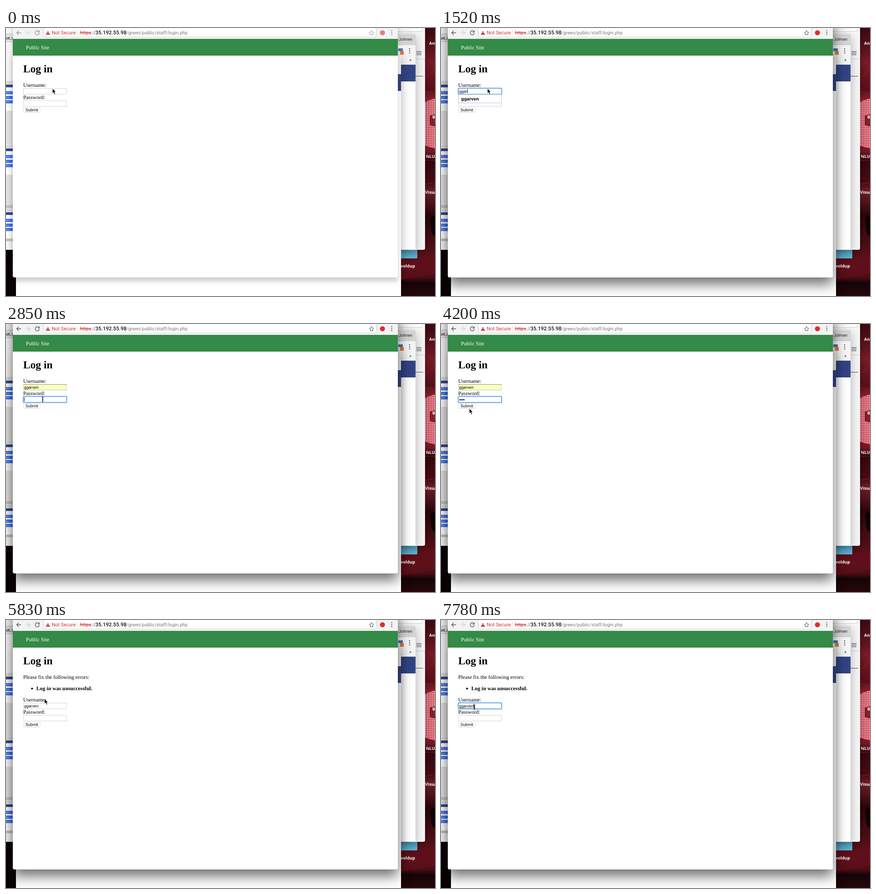
Recreate the animation shown at these times as an HTML page. Size 947 by 592 pixels, loop 8000 ms.

```html
<!DOCTYPE html>
<html lang="en">
<head>
<meta charset="utf-8">
<title>Log in</title>
<style>
  html, body { margin: 0; width: 100%; height: 100%; overflow: hidden; background: #0b0405; }
  svg { display: block; width: 947px; height: 592px; }
  text { font-family: "Liberation Serif", serif; font-size: 11.8px; white-space: pre; text-rendering: geometricPrecision; }
  .ui, .ui text { font-family: Roboto, sans-serif; font-size: 9px; }
  .ctl { font-family: "Liberation Sans", sans-serif; font-size: 8.85px; }
  .icon { font: bold 9.3px "Open Sans", sans-serif; fill: #fff; }
  .b { font-weight: bold; }
  .field { fill: #fff; stroke: #d4d4d4; }
  .ring { fill: none; stroke: #69a6f0; stroke-width: 2; }
  .back { filter: drop-shadow(0 5px 11px rgba(0, 0, 0, .3)); }
  #win { filter: drop-shadow(0 8px 6px rgba(0, 0, 0, .2)); }
  #win.active { filter: drop-shadow(0 15px 14px rgba(0, 0, 0, .56)); }
  #tools { opacity: .6; }
  .active + #chrome #tools { opacity: 1; }
</style>
</head>
<body>
<svg viewBox="0 0 947 592">
  <defs>
    <linearGradient id="wall" x2="0" y2="1">
      <stop offset="0" stop-color="#3a0a11"/>
      <stop offset=".13" stop-color="#7a1a26"/>
      <stop offset=".23" stop-color="#5a111b"/>
      <stop offset=".27" stop-color="#8d2431"/>
      <stop offset=".46" stop-color="#7a1a26"/>
      <stop offset=".49" stop-color="#35080e"/>
      <stop offset=".58" stop-color="#4a0c14"/>
      <stop offset=".61" stop-color="#70202a"/>
      <stop offset=".7" stop-color="#2a070b"/>
      <stop offset=".85" stop-color="#5c1019"/>
      <stop offset=".93" stop-color="#4d0e16"/>
      <stop offset=".95" stop-color="#150507"/>
      <stop offset="1" stop-color="#25070b"/>
    </linearGradient>
    <pattern id="led" width="4" height="4" patternUnits="userSpaceOnUse">
      <rect width="4" height="4" fill="#cf3a4a"/>
      <circle cx="2" cy="2" r="1.4" fill="#f8c6ca"/>
    </pattern>
    <g id="thumb">
      <rect width="15" height="66" fill="#fff"/>
      <rect width="15" height="7" fill="#ddd"/>
      <rect y="8" width="15" height="6" fill="#334a8d"/>
      <path d="M0 26h15M0 36.500h15M0 46h15" stroke="#3f72e6" stroke-width="7"/>
      <path d="M0 26h9M0 36.500h7M0 46h8" stroke="#9db7f2"/>
    </g>
  </defs>

  <!-- desktop -->
  <rect width="947" height="592" fill="#0b0405"/>
  <rect x="865" width="82" height="592" fill="url(#wall)"/>
  <path d="M925 60l22 26M925 112l22-22M925 140l22 6M925 292h22M925 345l22-4" stroke="#a52b39" fill="none" opacity=".7"/>
  <path d="M925 164q10-6 22-8v34l-12 4v20l12 4v48q-10-2-22-6z" fill="url(#led)"/>
  <path d="M937 420q6-8 10-2v40q-10 4-10-38z" fill="#0c0304"/>
  <path d="M872 512l75-10v40l-75 14z" fill="#68121d" opacity=".55"/>
  <rect x="865" y="480" width="43" height="29" rx="2" fill="#60b9dc"/>
  <text class="icon" x="934" y="37">And</text>
  <text class="icon" x="941" y="200">B</text>
  <text class="icon" x="927" y="287">NLU</text>
  <text class="icon" x="925" y="366">Visual</text>
  <text class="icon" x="871" y="529">voldup</text>

  <!-- windows behind -->
  <rect class="back" x="-20" y="-20" width="945" height="510" rx="4" fill="#f7f7f7"/>
  <path d="M0 13h15v17H0zM0 183h15v74H0zM0 324h15v67H0z" fill="#e3e3e3"/>
  <path d="M0 391h15v7H0zM0 464h15v7H0z" fill="#c4c4c4"/>
  <path d="M0 12.500h15M0 30.500h15" stroke="#c9c9c9"/>
  <text class="ui" x="-1" y="25">ue_s</text>
  <use href="#thumb" y="117"/><use href="#thumb" y="258"/><use href="#thumb" y="399"/>
  <path d="M865 7.500h52q2 0 2-2V0" fill="#fff" stroke="#cfcfcf"/>
  <path d="M904 68.500h21" stroke="#d0d0d0"/>
  <g class="back">
    <rect x="400" y="14" width="504" height="476" rx="2" fill="#fff"/>
    <rect x="400" y="14" width="504" height="24" fill="#d3d3d3"/>
    <rect x="400" y="38" width="504" height="43" fill="#f4f4f4"/>
    <rect x="400" y="81" width="504" height="37" fill="#334485"/>
  </g>
  <path d="M906 52h11M906 55.500h11M906 59h11" stroke="#666" stroke-width="1.500"/>
  <path d="M904 106.500h17" stroke="#444"/>
  <g class="back">
    <rect x="22" y="60" width="850" height="600" fill="#fff"/>
    <rect x="22" y="60" width="850" height="42" fill="#ececec"/>
    <rect x="22" y="102" width="850" height="37" fill="#334485"/>
  </g>
  <text class="ui" x="867" y="28" fill="#222">Jolmen</text>
  <rect x="866" y="45" width="10" height="6" fill="#4076b8"/>
  <rect x="870" y="51" width="8" height="8" fill="#e8702a"/>
  <g fill="#555"><circle cx="891" cy="46" r="1.300"/><circle cx="891" cy="50.500" r="1.300"/><circle cx="891" cy="55" r="1.300"/></g>
  <text class="ui" x="890" y="74" fill="#333" style="font-size:11px">»</text>

  <!-- browser -->
  <rect id="win" x="15" y="-40" width="850" height="591" rx="4" fill="#fff"/>
  <g id="chrome">
    <rect x="15" width="850" height="24" fill="#f3f3f3"/>
    <rect x="82.500" y="-6" width="735" height="26" rx="3" fill="#fff" stroke="#d0d0d0"/>
    <g id="tools" fill="none" stroke="#555" stroke-width="1.300">
      <path d="M33 10.500H23.500M28 6l-4.500 4.500L28 15"/>
      <path d="M43.500 10.500H53M48.500 6l4.500 4.500L48.500 15" stroke="#d0d0d0"/>
      <path id="reload" d="M72.500 7.500A4.600 4.600 0 1 0 73.600 11.500M73.500 5.500V9H70"/>
      <path id="stop" d="M65 6.500l8 8M73 6.500l-8 8"/>
      <path d="M807 5.500l1.500 3.400 3.600.4-2.700 2.500.8 3.700-3.200-1.900-3.200 1.900.8-3.700-2.700-2.500 3.600-.4z" stroke-width="1"/>
      <circle cx="831" cy="10.500" r="5.500" fill="#dc2f2b" stroke="none"/>
      <g fill="#555" stroke="none"><circle cx="851.500" cy="6" r="1.200"/><circle cx="851.500" cy="10.300" r="1.200"/><circle cx="851.500" cy="14.600" r="1.200"/></g>
    </g>
    <path d="M92.500 6.500l4.700 8.500h-9.400z" fill="#c9302c"/>
    <path d="M92.500 9.500v2.500M92.500 13v1" stroke="#fff"/>
    <path d="M158.500 4v13" stroke="#ddd"/>
    <g class="ui">
      <text x="101" y="14" fill="#c9302c" style="font-size:10.800px">Not Secure</text>
      <text x="163" y="14" fill="#c9302c" style="font-size:10.900px">https<tspan fill="#777">://</tspan></text>
      <text x="197.500" y="14" fill="#111" style="font-size:11.500px;font-weight:500">35.192.55.98</text>
      <text x="265.500" y="14" fill="#777" style="font-size:10.400px">/green/public/staff/login.php</text>
    </g>
    <path d="M163 10.500h25" stroke="#c9302c"/>
  </g>
  <rect x="15" y="24" width="850" height="37" fill="#348a47"/>
  <text x="44" y="47" fill="#fff">Public Site</text>
  <text class="b" x="38" y="98" style="font-size:23.600px">Log in</text>

  <g id="errors">
    <text x="38" y="130">Please fix the following errors:</text>
    <circle cx="57.500" cy="151.500" r="2"/>
    <text class="b" x="67" y="155">Log in was unsuccessful.</text>
  </g>

  <g id="form">
    <text x="38" y="130">Username:</text>
    <text x="38" y="157">Password:</text>
    <rect class="field" x="38.500" y="133.500" width="95" height="12.500"/>
    <g id="filled">
      <rect x="38.500" y="133.500" width="95" height="12.500" fill="#faffbd" stroke="#d0d0c0"/>
      <path d="M38 133.500h96" stroke="#8f8f85"/>
    </g>
    <rect class="field" x="38.500" y="160.500" width="95" height="12.500"/>
    <rect x="38.500" y="175.500" width="37" height="11" rx="2.500" fill="#fff" stroke="#e2e2e2"/>
    <path d="M40 186.500h34" stroke="#cfcfcf"/>
    <text class="ctl" x="43" y="184" style="font-size:9px">Submit</text>
    <path id="typo" d="M40 144.500h33" stroke="#e0453f" stroke-width="1.200" stroke-dasharray="1.500 1"/>
    <text class="ctl" id="user" x="40" y="143"></text>
    <g id="dots"><circle cx="42.300" cy="167.300" r="1.500"/><circle cx="46.300" cy="167.300" r="1.500"/><circle cx="50.300" cy="167.300" r="1.500"/></g>
    <rect class="ring" id="ring" x="38" width="96" height="13.500" rx="1"/>
    <path id="caret" d="M0 0v9" stroke="#111"/>
    <g id="list">
      <rect id="menu" x="38.500" y="147" width="95" fill="#fff" stroke="#a9c6ea"/>
      <rect id="hover" x="39" y="147.500" width="94" height="17.500" fill="#e6ebf3"/>
      <text class="ctl b" id="option" x="44.500" y="160" style="font-size:10.100px"></text>
    </g>
  </g>

  <g id="status">
    <path d="M15 538.500h280q2.500 0 2.500 2.500v9.500H15z" fill="#f1f1f1" stroke="#b9b9b9"/>
    <text class="ui" x="17" y="548" fill="#222">Waiting for 35.192.55.98...</text>
  </g>
  <g id="pointer">
    <path id="arrow" d="M0 0v11l2.500-2.300 2 4.500 2-.9-2-4.300h3.300z" stroke="#fff" stroke-width=".8"/>
    <path id="beam" d="M-2-5.500q2 0 2 1.500V4q0 1.500-2 1.500M2-5.500q-2 0-2 1.500V4q0 1.500 2 1.500M-1 1h2" fill="none" stroke="#111"/>
  </g>
</svg>
<script>
const LOOP = 8000, NAME = "ggarven";
const $ = id => document.getElementById(id);
const show = (id, on) => { $(id).style.display = on ? "" : "none"; };
const at = (steps, t) => steps.findLast(s => s[0] <= t).slice(1);

const typed = [[0, 0], [1080, 1], [1230, 2], [1370, 3], [1520, 4], [1810, 7]];
const dotCount = [[0, 0], [3300, 1], [3450, 2], [3600, 3], [5540, 0]];
const focus = [[0, ""], [150, "user"], [2700, "pass"], [4650, ""], [7330, "user"]];
const caret = [[0, 0], [150, 1], [630, 0], [1080, 1], [1810, 0], [2850, 1], [3750, 0], [7330, 1]];
const pointer = [
  [0, 102.5, 133.5, "arrow"], [1810, 96, 146, "arrow"], [1960, 88, 153, "arrow"],
  [2410, 84, 162, "beam"], [2560, 81, 166.5, "beam"], [3300, 0, 0, "none"],
  [3750, 74, 168, "beam"], [3900, 68, 192, "arrow"], [4050, 63, 190, "arrow"],
  [4200, 62.5, 186.5, "arrow"], [4500, 62.5, 185, "arrow"], [5540, 63, 187, "beam"],
  [5830, 85, 174, "arrow"], [5980, 130, 158, "beam"], [6130, 172, 152, "beam"],
  [6280, 184, 150, "beam"], [6430, 140, 154, "beam"], [6580, 100.5, 157.5, "beam"],
  [6730, 176, 154, "beam"], [6880, 140, 165, "arrow"], [7030, 104, 180, "arrow"],
  [7180, 84, 189, "beam"], [7480, 78, 192, "beam"], [7780, 74, 192.5, "beam"]
];

function draw(t) {
  const failed = t >= 5540, loading = t >= 4800 && !failed;
  const listed = t >= 1080 && t < 2110;
  const [field] = at(focus, t), [dots] = at(dotCount, t);
  const user = $("user");

  $("win").setAttribute("class", t >= 150 ? "active" : "");
  show("reload", !loading);
  show("stop", loading);
  show("status", t >= 5390 && !failed);
  show("errors", failed);
  $("form").setAttribute("transform", `translate(0 ${failed ? 50 : 0})`);

  user.textContent = NAME.slice(0, at(typed, t)[0]);
  show("filled", t >= 1810 && !failed);
  show("typo", t >= 7330);
  [...$("dots").children].forEach((dot, i) => { dot.style.display = i < dots ? "" : "none"; });

  show("ring", field);
  $("ring").setAttribute("y", field === "pass" ? 160 : 133);
  const end = field === "pass" ? dots * 4 : user.getComputedTextLength();
  show("caret", at(caret, t)[0]);
  $("caret").setAttribute("transform", `translate(${Math.round(40 + end) + .5} ${field === "pass" ? 162 : 135})`);

  show("list", listed);
  $("menu").setAttribute("height", t < 1230 ? 36 : 18.5);
  show("hover", t >= 1810);
  $("option").textContent = NAME;

  const [x, y, shape] = at(pointer, t);
  $("pointer").setAttribute("transform", `translate(${x} ${y})`);
  show("arrow", shape === "arrow");
  show("beam", shape === "beam");
}

const start = performance.now();
function tick() {
  draw((performance.now() - start) % LOOP);
  requestAnimationFrame(tick);
}
tick();
</script>
</body>
</html>
```
